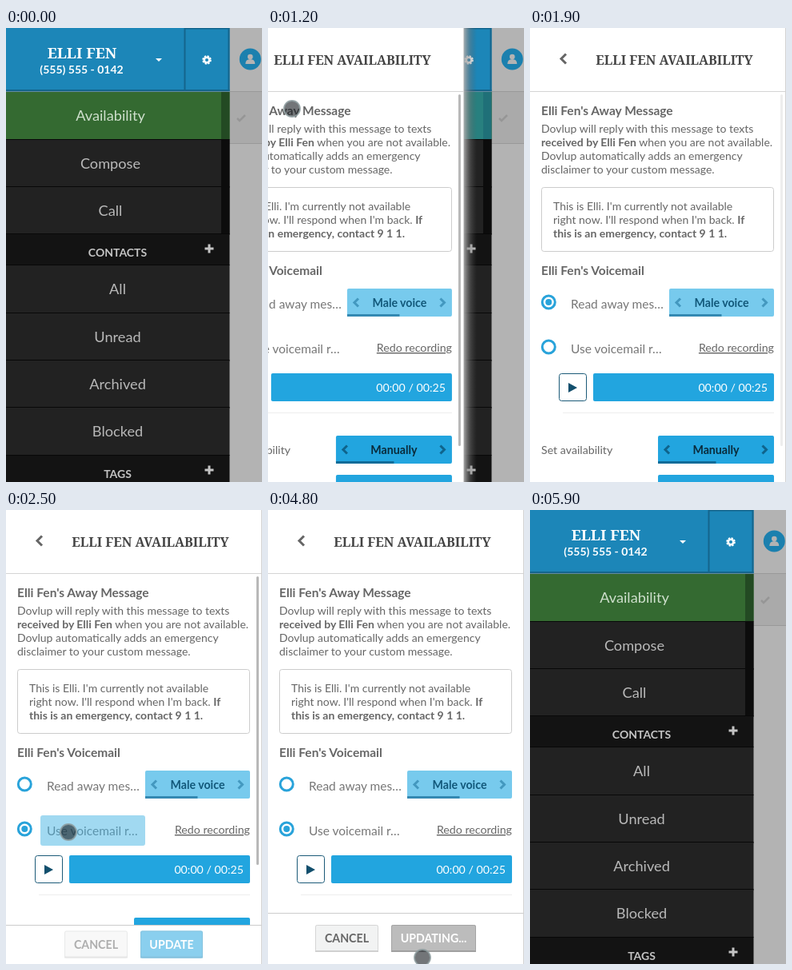
An HTML page that plays this animation: 320x568 px, repeating every 6200 ms.

```html
<!DOCTYPE html>
<html lang="en">
<head>
<meta charset="utf-8">
<title>Availability settings</title>
<style>
  html, body { margin: 0; width: 100%; height: 100%; overflow: hidden; background: #b3b3b3; }
  svg { display: block; width: 320px; height: 568px; font-family: Lato, sans-serif; }
  .slab { font-family: "Noto Serif", serif; font-weight: 700; }
  .b { font-weight: 700; }
</style>
</head>
<body>
<svg id="stage" viewBox="0 0 320 568" xmlns="http://www.w3.org/2000/svg"></svg>
<script>
const LOOP = 6200, STEP = 100;
const BLUE = '#22a5df', GREY = '#666';

const rect = (x, y, w, h, fill, extra = '') =>
  `<rect x="${x}" y="${y}" width="${w}" height="${h}" fill="${fill}" ${extra}/>`;
const text = (x, y, size, fill, str, extra = '') =>
  `<text x="${x}" y="${y}" font-size="${size}" fill="${fill}" ${extra}>${str}</text>`;
const MID = 'text-anchor="middle"', END = 'text-anchor="end"', BOLD = 'class="b"';
const bold = str => `<tspan class="b">${str}</tspan>`;

// dir: -1 points left, 1 points right
const chevron = (x, y, dir, size, color, weight = 3) =>
  `<path d="M${x - dir * size / 2} ${y - size}l${dir * size} ${size}l${-dir * size} ${size}" fill="none" stroke="${color}" stroke-width="${weight}"/>`;
const plus = (x, y) =>
  `<path d="M${x - 5.5} ${y}h11M${x} ${y - 5.5}v11" stroke="#c4c4c4" stroke-width="3"/>`;

const MENU_W = 279.5;

function menuRow(y, label, x = 139.5) {
  return rect(0, y, MENU_W, 60, '#222') + rect(0, y - 1, MENU_W, 1, '#080808') +
    text(x, y + 36, 18.2, '#b9b9b9', label, MID);
}

function menuSection(y, label) {
  return rect(0, y, MENU_W, 39, '#131313') + rect(0, y - 1, MENU_W, 1, '#080808') +
    text(139.5, y + 28, 14, '#c4c4c4', label, `${MID} ${BOLD}`) + plus(254, y + 18);
}

function menu() {
  return rect(0, 0, 320, 568, '#b3b3b3') +
    rect(279, 79, 41, 66, '#aaa') + rect(279, 79, 41, 1, '#999') + rect(279, 144, 41, 1, '#999') +
    '<path d="M289 113l3 3l7-7" fill="none" stroke="#969696" stroke-width="2.5"/>' +
    '<circle cx="305.3" cy="39" r="13.5" fill="#1b80ae"/>' +
    '<circle cx="305.3" cy="36" r="3.3" fill="#b3b3b3"/><path d="M299.3 45q0-6 6-6t6 6z" fill="#b3b3b3"/>' +
    rect(0, 0, MENU_W, 79, '#1c86b8') + rect(0, 77, MENU_W, 2.5, '#14658c') +
    rect(222.5, 0, 2, 79, '#14658c') + rect(277.5, 0, 2, 79, '#14658c') + rect(224, 0, 54, 1.5, '#14658c') +
    text(95, 38, 18.5, '#fff', 'ELLI FEN', `${MID} class="slab"`) +
    text(94.5, 57, 14, '#fff', '(555) 555 - 0142', `${MID} ${BOLD}`) +
    '<path d="M187 38h8l-4 4z" fill="#fff"/>' +
    '<g fill="none" stroke="#fff"><circle cx="251" cy="40" r="3.3" stroke-width="2.6"/>' +
    '<circle cx="251" cy="40" r="4.7" stroke-width="2.2" stroke-dasharray="2.2 1.49"/></g>' +
    rect(0, 80, MENU_W, 59, '#346a31') + rect(269, 80, 10.5, 59, '#234a23') +
    rect(0, 80, MENU_W, 59, 'rgba(28,150,205,.5)', 'id="rowTap"') +
    text(130.5, 116, 18.2, '#cfe0cd', 'Availability', `${MID} id="rowLabel"`) +
    menuRow(140, 'Compose', 130.5) + menuRow(199, 'Call', 130.5) +
    rect(269, 139, 10.5, 119, '#0c0c0c') +
    menuSection(258, 'CONTACTS') +
    ['All', 'Unread', 'Archived', 'Blocked']
      .map((label, i) => menuRow(Math.round(297.2 + i * 59.4), label)).join('') +
    menuSection(535, 'TAGS');
}

const radio = (y, id) =>
  `<circle cx="23.3" cy="${y}" r="8" fill="#fff" stroke="#29a3da" stroke-width="3"/>` +
  `<circle id="${id}" cx="23.3" cy="${y}" r="4" fill="#29a3da"/>`;

function stepper(x, y, label, fill, ink, arrow, line) {
  const w = 305 - x;
  return rect(x, y, w, 35, fill, 'rx="2"') + rect(x, y + 32, w / 2, 3, line) +
    chevron(x + 11.5, y + 17.5, -1, 5, arrow) + chevron(293, y + 17.5, 1, 5, arrow) +
    text(x + w / 2, y + 23, 14.2, ink, label, `${MID} ${BOLD}`);
}

function page() {
  const lines = (x, y, rows) => rows.map((s, i) => text(x, y + i * 17, 14, GREY, s)).join('');
  return rect(0, 0, 320, 568, '#fff') +
    rect(320, 0, 16, 568, 'url(#edge)') +
    chevron(42, 38.5, -1, 6, GREY) +
    text(180.5, 45.5, 16, '#444', 'ELLI FEN AVAILABILITY', `${MID} class="slab"`) +
    rect(0, 79, 320, 1, '#d4d4d4') +
    text(14, 109, 15.5, GREY, "Elli Fen's Away Message", BOLD) +
    lines(14, 131, [
      'Dovlup will reply with this message to texts',
      bold('received by Elli Fen') + ' when you are not available.',
      'Dovlup automatically adds an emergency',
      'disclaimer to your custom message.']) +
    rect(14.5, 199.5, 290, 80, '#fff', 'rx="3" stroke="#ccc"') +
    lines(29, 228, [
      "This is Elli. I'm currently not available",
      "right now. I'll respond when I'm back. " + bold('If'),
      bold('this is an emergency, contact 9 1 1.')]) +
    text(14, 309, 15.5, GREY, "Elli Fen's Voicemail", BOLD) +
    radio(343, 'pickRead') + text(51, 351, 15.5, '#777', 'Read away mes…') +
    stepper(174, 326, 'Male voice', '#77caed', '#12587a', '#4398bf', '#3489b2') +
    radio(399, 'pickVoice') + text(51, 407, 15.5, '#777', 'Use voicemail r…') +
    rect(43, 382, 131, 38, 'rgba(60,175,225,.48)', 'id="labelTap" rx="3"') +
    text(305, 405, 14.2, GREY, 'Redo recording', `${END} text-decoration="underline"`) +
    rect(36.5, 432.5, 34, 34, '#fff', 'rx="3" stroke="#1b5a78"') +
    '<path d="M48 444v12l11-6z" fill="#124f6d"/>' +
    rect(79, 432, 226, 35, BLUE, 'rx="2"') +
    text(297, 455, 14.2, '#fff', '00:00 / 00:25', END) +
    rect(41, 481, 264, 1, '#eee') +
    text(14, 533, 14.2, GREY, 'Set availability') +
    stepper(160, 510, 'Manually', BLUE, '#0a2b3b', '#0f648c', '#0e6c99') +
    rect(160, 559, 145, 35, BLUE, 'rx="2"') +
    rect(313, 83, 3, 440, '#b8b8b8', 'id="scrollbar" rx="1.5"') +
    `<g id="bar">${rect(0, 0, 320, 64, '#fff')}${rect(0, 0, 320, 1, '#ccc')}</g><g id="buttons"></g>` +
    rect(319, 0, 1, 568, '#d2d2d2');
}

function button(x, w, label, fill, line, ink) {
  return rect(x, 0, w, 34, fill, 'rx="2"') + rect(x, 32, w, 2, line) +
    rect(x + .5, .5, w - 1, 33, 'none', `rx="2" stroke="${line}" stroke-opacity=".85"`) +
    text(x + w / 2, 22, 14.2, ink, label, `${MID} ${BOLD}`);
}

const cancelButton = x => button(x, 79, 'CANCEL', '#f2f3f3', '#d0d0d0', GREY);
const idleButtons = cancelButton(73) + button(168, 78, 'UPDATE', BLUE, '#1b8cc0', '#fff');
const busyButtons = cancelButton(59) + button(154, 106, 'UPDATING...', '#bcbcbc', '#a0a0a0', '#fff');

const stage = document.getElementById('stage');
stage.innerHTML =
  '<defs><linearGradient id="edge"><stop stop-color="#b0b0b0" stop-opacity=".9"/>' +
  '<stop offset=".5" stop-color="#777" stop-opacity=".4"/><stop offset="1" stop-color="#555" stop-opacity="0"/></linearGradient></defs>' +
  menu() + `<g id="page">${page()}</g>` +
  '<circle id="dot" r="10" fill="rgba(20,25,30,.6)" stroke="rgba(140,155,158,.85)" stroke-width="1.8"/>';

const el = Object.fromEntries([...stage.querySelectorAll('[id]')].map(n => [n.id, n]));
const set = (name, attrs) => { for (const k in attrs) el[name].setAttribute(k, attrs[k]); };
const ramp = (t, from, to) => Math.min(1, Math.max(0, (t - from) / (to - from)));

// CSS "ease": cubic-bezier(.25, .1, .25, 1)
function ease(p) {
  const bez = (a, b, s) => 3 * a * s * (1 - s) ** 2 + 3 * b * s * s * (1 - s) + s ** 3;
  let lo = 0, hi = 1;
  for (let i = 0; i < 20; i++) {
    const s = (lo + hi) / 2;
    if (bez(.25, .25, s) < p) lo = s; else hi = s;
  }
  return bez(.1, 1, lo);
}

const taps = [
  { from: 1000, fade: 1400, to: 1700, x: 30, y: 101, drop: 0 },
  { from: 2500, fade: 2800, to: 3200, x: 78, y: 403, drop: 0 },
  { from: 3500, fade: 5100, to: 5400, x: 193, y: 546, drop: 14 }
];

function drawDot(t) {
  const tap = taps.find(k => t >= k.from && t < k.to);
  set('dot', { opacity: tap ? 1 - ramp(t, tap.fade, tap.to) : 0 });
  if (tap) set('dot', { cx: tap.x, cy: tap.y + tap.drop * ease(ramp(t, tap.from, tap.from + 500)) });
}

let buttonState;
function draw(t) {
  const slideIn = ease(ramp(t, 1000, 1430)), slideOut = ease(ramp(t, 5180, 5630));
  let x = -340;
  if (t >= 1000 && t < 5600) {
    x = t < 1700 ? Math.min(-1, -320 * (1 - slideIn)) : -320 * slideOut;
  }
  set('page', { transform: `translate(${x})` });

  const rowHeld = t >= 1000 && t < 1700;
  set('rowTap', { opacity: rowHeld ? 1 : 0 });
  set('rowLabel', { fill: rowHeld ? '#8ccbe0' : '#cfe0cd' });

  const voicemail = t >= 2500;
  set('pickRead', { opacity: voicemail ? 0 : 1 });
  set('pickVoice', { opacity: voicemail ? 1 : 0 });
  set('labelTap', { opacity: voicemail ? 1 - ramp(t, 2800, 3100) : 0 });
  set('scrollbar', {
    height: voicemail ? 361 : 440,
    opacity: 1 - (voicemail ? ramp(t, 2800, 3200) : ramp(t, 1600, 2000))
  });

  const height = 64 * ease(ramp(t, 2400, 2615));
  set('bar', { transform: `translate(0 ${568 - height})`, opacity: height > 0 ? 1 : 0 });
  set('buttons', { transform: `translate(0 ${551 - height / 2})`, opacity: ramp(t, 2400, 2590) });
  const state = t >= 3600 ? busyButtons : idleButtons;
  if (state !== buttonState) el.buttons.innerHTML = buttonState = state;

  drawDot(t);
}

const start = performance.now();
function frame() {
  const t = (performance.now() - start) % LOOP;
  draw(Math.floor(t / STEP) * STEP);
  requestAnimationFrame(frame);
}
frame();
</script>
</body>
</html>
```
